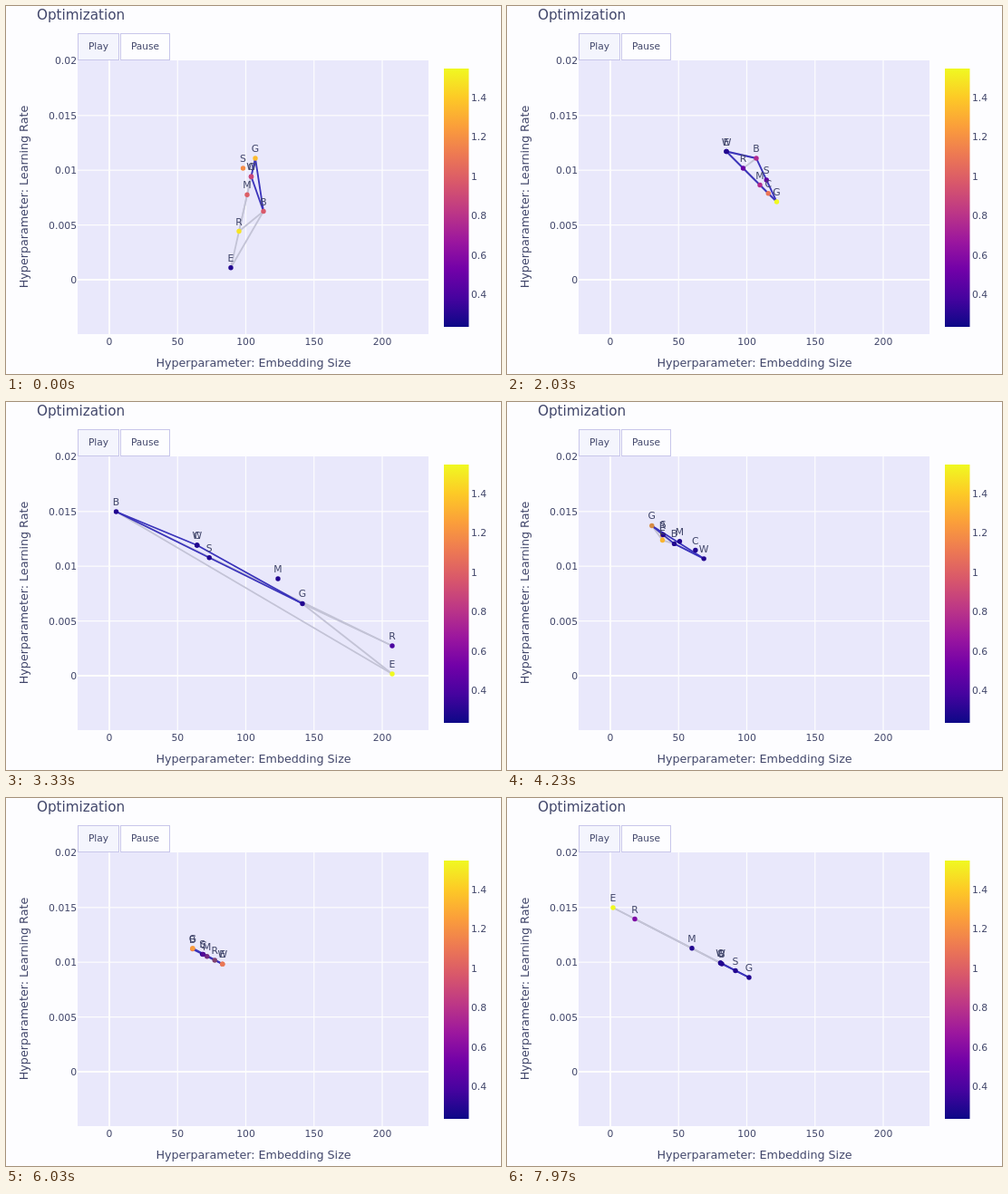
Write an HTML page with a canvas that moves like this. It is 546 px wide and 406 px high and loops after 8000 ms.

```html
<!DOCTYPE html>
<html lang="en">
<head>
<meta charset="utf-8">
<title>Optimization</title>
<style>
  html, body { margin: 0; width: 100%; height: 100%; overflow: hidden; background: #fdfdff; }
  canvas { display: block; }
</style>
</head>
<body>
<canvas id="stage" width="546" height="406"></canvas>
<script>
const ctx = document.getElementById('stage').getContext('2d');
const LOOP = 8000;
const INK = '#41466a', PAGE = '#fdfdff', PLOT = '#e9e8fb', GRID = '#fdfdfd', PALE = '#c3c3d6', BLUE = '#3a33bb';
const PLASMA = ['#0d0887', '#46039f', '#7201a8', '#9c179e', '#bd3786', '#d8576b', '#ed7953', '#fb9f3a', '#fdca26', '#f0f921'];
const NAMES = [...'ERSMCWBG'];
const EDGES = [['EG', PALE], ['EB', PALE], ['RG', PALE], ['RB', PALE], ['BW', BLUE], ['WG', BLUE], ['BG', BLUE]];

const lerp = (a, b, k) => a.map((v, i) => v + (b[i] - v) * k);
const clamp = (v, low, high) => Math.max(low, Math.min(high, v));
const smooth = k => k * k * (3 - 2 * k);

function plasma(value) {
  const at = value * (PLASMA.length - 1), i = Math.min(Math.floor(at), PLASMA.length - 2);
  const rgb = hex => [1, 3, 5].map(n => parseInt(hex.slice(n, n + 2), 16));
  return lerp(rgb(PLASMA[i]), rgb(PLASMA[i + 1]), at - i);
}

// One step of a simplex search: the candidate points follow from the three corners.
// `shown` picks the corner or candidate where B, G and W stand; `values` drive the colours.
function step(worst, best, other, shown, values) {
  const mid = lerp(best, other, 0.5);
  const beyond = k => {
    const [x, y] = lerp(worst, mid, k);
    return [clamp(x, 117, 426), clamp(y, 121, 300)];
  };
  const spots = { worst, best, other, M: mid, C: beyond(0.5), R: beyond(2), E: beyond(3), S: lerp(best, worst, 0.5) };
  for (const name of 'BGW') spots[name] = spots[shown[name]] || shown[name];
  return NAMES.map(name => [...spots[name], ...plasma(values[name] ?? 0.04)]);
}

const keys = [
  [1070, step([275, 168], [248, 190], [284, 226.5], { B: 'other', G: 'worst', W: 'C' },
    { R: 0.95, S: 0.72, M: 0.58, C: 0.45, W: 0.5, B: 0.56, G: 0.85 })],
  [2030, step([297.5, 216], [275, 168], [283, 227], { B: 'best', G: 'worst', W: 'E' },
    { R: 0.2, S: 0.18, M: 0.4, C: 0.65, B: 0.4, G: 1 })],
  [3330, step([121.5, 121], [327, 222.5], [273, 167.5], { B: 'worst', G: 'best', W: 'C' },
    { E: 1, R: 0.12 })],
  [4560, step([247.5, 184.5], [74.5, 97.5], [259.5, 192.5], { B: [198, 164], G: [124, 118], W: [218.5, 176] },
    { E: 0.8, R: 0.8, G: 0.8 })],
  [5330, step([190, 158.5], [236, 183], [200.5, 163], { B: 'worst', G: 'other', W: 'E' },
    { E: 0.58, W: 0.58, B: 0.75, G: 0.8 })],
  [6830, step([241.5, 185], [200.5, 163.5], [251.5, 190], { B: [225, 176.5], G: [212.5, 169], W: 'E' },
    { E: 0.72, R: 0.72, M: 0.55, C: 0.3, W: 0.75, B: 0.55, G: 0.72 })],
  [7970, step([267, 198], [237, 183], [171, 148.5], { B: 'best', G: 'worst', W: 'C' },
    { E: 1, R: 0.25 })]
];

function pointsAt(t) {
  const next = keys.findIndex(([time]) => t < time);
  if (next === 0) return keys[0][1];
  if (next < 0) return keys[keys.length - 1][1];
  const [[start, from], [end, to]] = keys.slice(next - 1, next + 1);
  const k = smooth((t - start) / (end - start));
  return from.map((p, i) => lerp(p, to[i], k));
}

function text(s, x, y, size = 10.8, align = 'center') {
  ctx.font = `${size}px "DejaVu Sans", sans-serif`;
  ctx.textAlign = align;
  ctx.fillStyle = INK;
  ctx.fillText(s, x, y);
}

function rect(x, y, w, h, fill) {
  ctx.fillStyle = fill;
  ctx.fillRect(x, y, w, h);
}

function button(label, x, w, fill) {
  rect(x, 30, w, 30, fill);
  ctx.strokeStyle = '#c8c6ea';
  ctx.lineWidth = 1;
  ctx.strokeRect(x + 0.5, 30.5, w - 1, 29);
  text(label, x + w / 2, 48, 10.6);
}

function drawChart() {
  rect(0, 0, 546, 406, PAGE);
  rect(79, 60, 387, 302, PLOT);

  for (let i = 0; i < 5; i++) {
    const x = 114 + i * 75.25, y = 302 - i * 60.4, width = i ? 1.2 : 2;
    rect(x - width / 2, 60, width, 302, GRID);
    if (i < 4) rect(79, y - width / 2, 387, width, GRID);
    text(String(i * 50), x, 374);
    text(String(i * 0.005), 78, y + 4, 10.8, 'right');
  }

  text('Optimization', 34, 15, 15.2, 'left');
  text('Hyperparameter: Embedding Size', 273, 398, 12.7);
  ctx.save();
  ctx.translate(24, 210.5);
  ctx.rotate(-Math.PI / 2);
  text('Hyperparameter: Learning Rate', 0, 0, 12.7);
  ctx.restore();

  button('Play', 79, 46, '#f4f5fd');
  button('Pause', 126, 55, PAGE);

  const scale = ctx.createLinearGradient(0, 354, 0, 69);
  PLASMA.forEach((color, i) => scale.addColorStop(i / (PLASMA.length - 1), color));
  rect(483, 69, 27.5, 285, scale);
  for (let i = 0; i < 6; i++) text(String((4 + 2 * i) / 10), 513, 322 - i * 43.5, 10.8, 'left');
}

function drawPoints(points) {
  const at = name => points[NAMES.indexOf(name)];
  ctx.lineWidth = 1.8;
  for (const [[a, b], color] of EDGES) {
    ctx.strokeStyle = color;
    ctx.beginPath();
    ctx.moveTo(at(a)[0], at(a)[1]);
    ctx.lineTo(at(b)[0], at(b)[1]);
    ctx.stroke();
  }
  for (const [x, y, ...rgb] of points) {
    ctx.fillStyle = `rgb(${rgb.map(Math.round)})`;
    ctx.beginPath();
    ctx.arc(x, y, 2.7, 0, 2 * Math.PI);
    ctx.fill();
  }
  points.forEach(([x, y], i) => text(NAMES[i], x, y - 7));
}

const born = performance.now();
function frame() {
  drawChart();
  drawPoints(pointsAt((performance.now() - born) % LOOP));
  requestAnimationFrame(frame);
}
frame();
</script>
</body>
</html>
```
